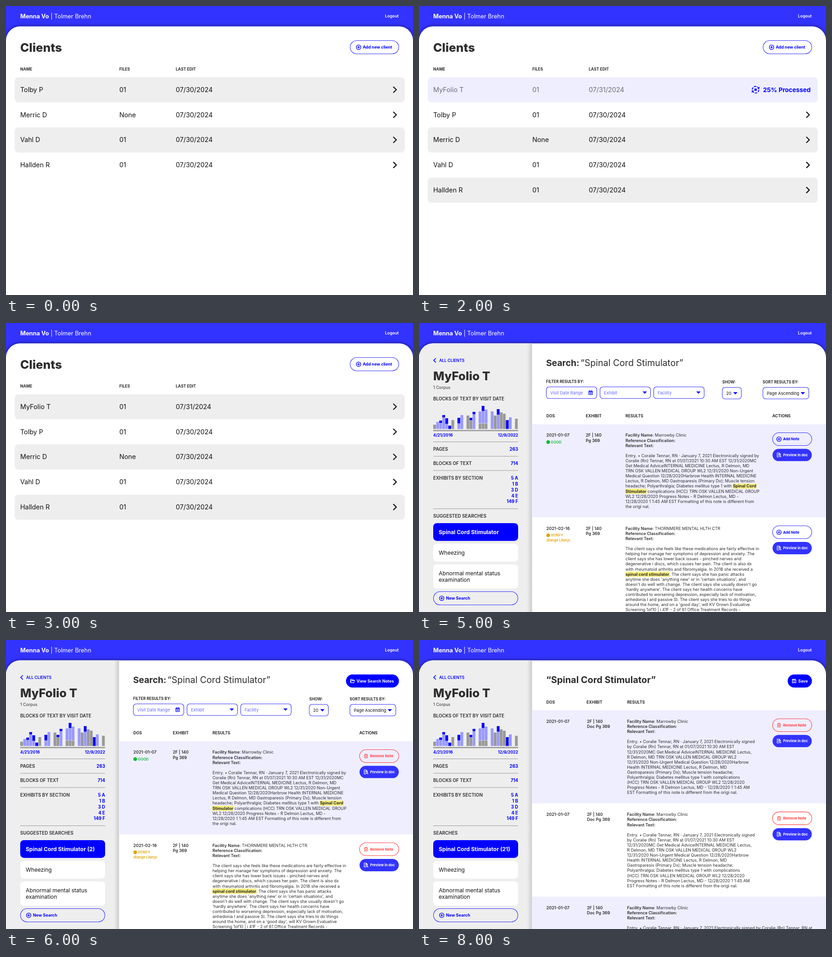
An HTML page for the animation above (9 s loop, 887x631 px).

```html
<!DOCTYPE html>
<html lang="en">
<head>
<meta charset="utf-8">
<title>Client files</title>
<style>
html, body { margin: 0; width: 100%; height: 100%; overflow: hidden; background: #fff; }
svg { display: block; width: 887px; height: 631px; font-family: Inter, sans-serif; }
text { white-space: pre; }
</style>
</head>
<body>
<svg id="stage" viewBox="0 0 887 631" xmlns="http://www.w3.org/2000/svg"></svg>
<script>
const stage = document.getElementById('stage');
const BLUE = '#0000ff', MID = '#3333ff', SOFT = '#6666ff', PALE = '#9999ff';
const GRAY = '#eeeeee', TINT = '#efeeff', INK = '#2d2d2d', RED = '#ff4040';
const FILE = 'MyFolio T';
const TERM = 'Spinal Cord Stimulator';
const SIDE = 246.4;

const text = (x, y, size, weight, fill, str, anchor = 'start') =>
  `<text x="${x}" y="${y}" font-size="${size}" font-weight="${weight}" fill="${fill}" text-anchor="${anchor}">${str}</text>`;
const box = (x, y, w, h, r, fill, stroke = 'none', sw = 1.1) =>
  `<rect x="${x}" y="${y}" width="${w}" height="${h}" rx="${r}" fill="${fill}" stroke="${stroke}" stroke-width="${sw}"/>`;
const line = (d, color, w = 1.2) =>
  `<path d="${d}" fill="none" stroke="${color}" stroke-width="${w}" stroke-linejoin="round"/>`;
const solid = (d, color) => `<path d="${d}" fill="${color}"/>`;
const dot = (x, y, r, fill, stroke = 'none', sw = 1.2) =>
  `<circle cx="${x}" cy="${y}" r="${r}" fill="${fill}" stroke="${stroke}" stroke-width="${sw}"/>`;
const at = (x, y, body) => `<g transform="translate(${x} ${y})">${body}</g>`;

// Icons, centred on (x, y)
const icon = {
  plus: (x, y, c) => dot(x, y, 4.9, 'none', c, 1.3) + line(`M${x - 2.8} ${y}h5.6M${x} ${y - 2.8}v5.6`, c, 1.3),
  down: (x, y) => solid(`M${x - 4.8} ${y - 2.5}h9.6l-4.8 5z`, BLUE),
  next: (x, y) => line(`M${x - 3.5} ${y - 6.5}l6.7 6.5-6.7 6.5`, '#111', 2.2),
  trash: (x, y, c) => at(x, y, line('M-4-2.8h8M-1.5-2.8v-1.4h3v1.4M-3-2.8v6.9h6v-6.9M-1-1v3.5M1-1v3.5', c, 1)),
  doc: (x, y, c) => at(x, y, line('M0 4.3h-3.9v-8.8h4.3l2.7 2.7v1.5M.2-4.3v2.8h2.7M-2.2-.8h2M-2.2 1.2h1', c, 1.1) +
    dot(1.9, 1.7, 1.7, 'none', c, 1.1) + line('M3.2 3l1.5 1.5', c, 1.2)),
  folder: (x, y, c) => at(x, y, line('M-4.3 3.6v-7.2h3l1.2 1.3h3.7v1.5M-4.3 3.6l1.7-4.7h7.4l-1.6 4.7z', c, 1.1)),
  save: (x, y, c) => at(x, y, line('M-3.9-3.9h6l1.8 1.8v6h-7.8zM-2-3.7v2.2h3.6v-2.2', c, 1.2) + dot(0, 1.4, 1.2, c)),
  calendar: (x, y, c) => at(x, y, box(-4, -3.8, 8, 8, 1, 'none', c, 1.2) +
    line('M-4-2h8M-2.2-5.2v2M2.2-5.2v2', c, 1.5) + line('M-2.6.2h5.2M-2.6 2.2h5.2', c, 1.1)),
  cloud: (x, y, c) => at(x, y, line('M-4 9.8h-4.5a6.5 6.5 0 0 1-1-12.9a9.7 9.7 0 0 1 19.1 1.9h.6a5.5 5.5 0 0 1 0 11h-6M0 9.8v-12.4M-5 1.8l5-4.9 5 4.9', c, 2.6)),
  lens: (x, y, c) => dot(x - 1.6, y - 1.7, 4.6, 'none', c, 2) + line(`M${x + 1.7} ${y + 1.7}l5 5`, c, 2.2),
  busy: (x, y, c) => at(x, y, `<circle r="7.2" fill="none" stroke="${c}" stroke-width="1.8" stroke-dasharray="5.5 2.04"/>` +
    box(-2.5, -2.5, 5, 5, .5, c) + solid('M8.3-6.8v4.8h-4.8zM-8.3 6.8v-4.8h4.8z', c))
};

const pill = (x, y, w, h, fill, stroke, color, size, pic, label, pad = 14) =>
  box(x, y, w, h, h / 2, fill, stroke) + icon[pic](x + pad, y + h / 2, color) +
  text(x + pad + 9, y + h / 2 + size * .36, size, 700, color, label);

const SHEET = 'M0 631V75.2a30.8 30.8 0 0 1 30.8-30.8H856.2a30.8 30.8 0 0 1 30.8 30.8V631z';
const DEFS = `<defs>
  <clipPath id="clip"><path d="${SHEET}"/></clipPath>
  <filter id="blur" x="-5%" y="-5%" width="110%" height="110%"><feGaussianBlur stdDeviation="4.5"/></filter>
  <linearGradient id="edge"><stop offset="0" stop-opacity="0"/><stop offset="1" stop-opacity=".14"/></linearGradient>
</defs>`;

const frame = body => DEFS + box(0, 0, 887, 631, 0, MID) +
  text(31, 27.3, 12.8, 400, '#fff', '<tspan font-weight="700">Menna Vo</tspan> | Tolmer Brehn') +
  text(856, 25.3, 8.9, 600, '#fff', 'Logout', 'end') +
  `<path d="${SHEET}" filter="url(#blur)" opacity=".55"/>` +
  `<g clip-path="url(#clip)">${box(0, 44, 887, 587, 0, '#fff')}${body}</g>`;

const CLIENTS = [['Tolby P', '01'], ['Merric D', 'None'], ['Vahl D', '01'], ['Hallden R', '01']];

function clientRow(i, name, files, date, busy) {
  const y = 155.5 + i * 54.8, base = y + 32.3, color = busy ? '#6b6b78' : '#111';
  const fill = busy ? TINT : i % 2 ? 'none' : GRAY;
  return box(19, y, 850, 54.8, 8, fill) +
    [[31, name], [247, files], [370, date]].map(([x, s]) => text(x, base, 14.3, 400, color, s)).join('') +
    (busy ? icon.busy(733.5, y + 27.2, BLUE) + text(853.5, base, 13.5, 700, BLUE, '25% Processed', 'end')
          : icon.next(847.5, y + 27.2));
}

// added: 0 none, 1 processing, 2 ready
function clients(added) {
  const rows = CLIENTS.map(([n, f]) => [n, f, '07/30/2024']);
  if (added) rows.unshift([FILE, '01', '07/31/2024']);
  return text(31, 100.3, 26, 800, INK, 'Clients') +
    pill(750, 75.5, 106, 29, '#fff', MID, BLUE, 8.9, 'plus', 'Add new client', 18.4) +
    [[31, 'NAME'], [247, 'FILES'], [370, 'LAST EDIT']].map(([x, s]) => text(x, 140.6, 8.6, 700, INK, s)).join('') +
    rows.map((r, i) => clientRow(i, ...r, added === 1 && i === 0)).join('');
}

const addPanel = () => clients(0) +
  `<rect y="44" width="887" height="587" opacity=".4"/>` +
  box(506, 44, 11.4, 587, 0, 'url(#edge)') + box(517.4, 44, 370, 587, 0, GRAY) +
  text(548, 94.2, 19.6, 700, INK, 'Add New Client') +
  box(548.5, 130.5, 307.5, 40, 8, '#fff', MID) + text(561, 155.2, 13.1, 400, SOFT, 'Client Name') +
  box(548.5, 177.5, 307.5, 128, 8, '#fff', MID) + icon.cloud(702.3, 215.5, SOFT) +
  ['Drag document here', 'or', '<tspan text-decoration="underline">browse files</tspan>']
    .map((s, i) => text(702.3, 251.8 + i * 16, 13.1, 400, SOFT, s, 'middle')).join('') +
  text(561, 343.2, 13.1, 400, BLUE, 'Cancel') +
  box(631.5, 318, 225, 41, 20.5, BLUE) + text(744, 343.2, 13.1, 700, '#fff', 'Add Client', 'middle');

// Bar slot, then segment heights from the base up: g gray, l light, b blue
const BARS = '0g10 1l16 2l13b6 3l25b6 4l11b13 5b8 6g20 8l12b13 9l31 11g30 12g19b6 13l32b6 15g12l27 16g13l26b12 17g12l31 19l39 20g30 21l31b13 22g37 23g34 24b20 25l26 27g23';
const PLAIN = '0g10 1g16 2g14 3g28 4g24 5g8 6g20 8g24 9g28 11g30 12g23 13g39 15g39 16g48 17g43 19g39 20g30 21g42 22g37 23g34 24g20 25g27 27g23';
function chart(spec) {
  const tone = { g: '#999', l: PALE, b: BLUE };
  return spec.split(' ').map(bar => {
    let y = 232;
    const x = 31 + parseInt(bar) * 6.6;
    return [...bar.matchAll(/([glb])(\d+)/g)].map(([, k, h]) => {
      y -= +h;
      return box(x, y, 6, h - .6, 0, tone[k]);
    }).join('');
  }).join('') + box(31, 233.6, 185, 2.6, 0, '#999');
}

function sidebar(active, title, count) {
  const label = (y, s) => text(31, y, 9.9, 600, INK, s);
  const value = (y, s) => text(216, y, 9.7, 700, BLUE, s, 'end');
  const cut = n => active ? n.slice(0, -1) : n;
  const sections = ['51 A', '10 B', '39 D', '42 E', '1496 F'];
  return box(0, 44, SIDE, 587, 0, GRAY) + box(SIDE - 11, 44, 11, 587, 0, 'url(#edge)') +
    line('M36.8 77l-4.8 4.6 4.8 4.6', BLUE, 1.6) + text(44, 84.7, 8.7, 600, BLUE, 'ALL CLIENTS') +
    text(31, 125.2, 25.7, 800, INK, FILE) + text(31, 143.8, 9, 400, INK, '1 Corpus') +
    text(31, 168.5, 9.8, 600, INK, 'BLOCKS OF TEXT BY VISIT DATE') +
    chart(active ? BARS : PLAIN) +
    text(31, 248, 8.7, 700, BLUE, '4/21/2016') + text(216, 248, 8.7, 700, BLUE, '12/9/2022', 'end') +
    line('M31 259.5h185M31 291h185M31 322h185M31 405.5h185', '#999', 1) +
    label(278.7, 'PAGES') + value(278.7, cut('2631')) +
    label(310.3, 'BLOCKS OF TEXT') + value(310.3, cut('7149')) +
    label(341.8, 'EXHIBITS BY SECTION') +
    sections.map((s, i) => {
      const [n, k] = s.split(' ');
      return value(341.8 + i * 12.9, cut(n) + ' ' + k);
    }).join('') +
    label(424.8, title) +
    box(31, 437, 185, 38.7, 8, active ? BLUE : '#fff') +
    (active ? text(43, 460.8, 12, 700, '#fff', TERM + count) : text(43, 460.8, 12, 400, '#111', TERM)) +
    box(31, 482, 185, 39, 8, '#fff') + text(43, 505.8, 12, 400, '#111', 'Wheezing') +
    box(31, 527, 185, 53, 8, '#fff') + text(43, 550.8, 12, 400, '#111', 'Abnormal mental status') +
    text(43, 565, 12, 400, '#111', 'examination') +
    (active ? box(31.5, 586.5, 184, 29, 14.5, 'none', MID) + icon.plus(49.5, 601, BLUE) +
      text(58.7, 604.3, 9, 700, BLUE, 'New Search') : '');
}

function filters(dy) {
  const field = (x, w, y, s, color) => box(x + .5, y + dy, w, 25.3, 6, '#fff', MID) +
    text(x + 9, y + 16 + dy, 9.2, 400, color, s);
  return text(277, 126.5 + dy, 8.4, 700, INK, 'FILTER RESULTS BY:') +
    text(661, 127.7 + dy, 8.4, 700, INK, 'SHOW:') + text(749, 127.7 + dy, 8.4, 700, INK, 'SORT RESULTS BY:') +
    field(277, 110, 135.5, 'Visit Date Range', SOFT) + icon.calendar(374, 148.3 + dy, BLUE) +
    field(394, 110, 135.5, 'Exhibit', SOFT) + icon.down(492, 148 + dy) +
    field(511, 110, 135.5, 'Facility', SOFT) + icon.down(609, 148 + dy) +
    field(660.5, 41.5, 136.5, '20', '#111') + icon.down(689.5, 149.5 + dy) +
    field(749, 100, 136.5, 'Page Ascending', '#111') + icon.down(836.5, 149.5 + dy);
}

const searchForm = () => sidebar(false, 'SUGGESTED SEARCHES') +
  text(277, 94, 19.4, 700, INK, 'Search document') + filters(0) +
  box(277.5, 181, 578.5, 35, 17.5, '#fff', MID) + icon.lens(298.5, 198.5, BLUE) +
  text(311, 203.6, 14.5, 400, PALE, 'New Search, eg ' + TERM) +
  box(740, 180.5, 116.5, 36, 18, BLUE) + text(798, 203.2, 12.9, 700, '#fff', 'RUN SEARCH', 'middle');

// *bold* and [highlighted bold]
const rich = s => s.replace(/\*(.+?)\*/g, '<tspan font-weight="600">$1</tspan>')
  .replace(/\[(.+?)\]/g, '<tspan class="hit" font-weight="700">$1</tspan>');
const lines = (x, y, list) => list.split('\n').map((s, i) =>
  s && text(x, (y + i * 11.1).toFixed(1), 9, 400, INK, rich(s))).join('');
const intro = place => `*Facility Name*: ${place}\n*Reference Classification:*\n*Relevant Text:*\n\n`;
const CLINIC = 'Marrowby Clinic';

const NOTE = `Entry. • Coralie Tennar, RN · January 7, 2021 Electronically signed by
Coralie (Rn) Tennar, RN at 01/07/2021 10:30 AM EST 12/31/2020MC
Get Medical AdviceINTERNAL MEDICINE Lectus, R Delmon, MD
TRN OSK VALLEN MEDICAL GROUP WL2 12/31/2020 Non-Urgent
Medical Question 12/28/2020Harbrow Health INTERNAL MEDICINE
Lectus, R Delmon, MD Gastroparesis (Primary Dx); Muscle tension
headache; Polyarthralgia; Diabetes mellitus type 1 with [Spinal Cord]
[Stimulator] complications (HCC) TRN OSK VALLEN MEDICAL GROUP
WL2 12/28/2020 Progress Notes - R Delmon Lectus, MD -
12/28/2020 1 1:45 AM EST Formatting of this note is different from
the origi nal.`;

const VISIT = `The client says she feels like these medications are fairly effective in
helping her manage her symptoms of depression and anxiety. The
client says she has lower back issues - pinched nerves and
degenerative i discs, which causes her pain. The client is also dx
with rheumatoid arthritis and fibromyalgia. In 2018 she received a
[spinal cord stimulator]. The client says she has panic attacks
anytime she does 'anything new' or in 'certain situations', and
doesn't do well with change. The client says she usually doesn't go
'hardly anywhere'. The client says her health concerns have
contributed to worsening depression, especially lack of motivation,
anhedonia I and passive SI. The client says she tries to do things
around the home, and on a 'good day', will KV Grown Evaluative
Screening 1of10 | i 41F - 2 of 61 Office Treatment Records -`;

const SAVED = `Entry. • Coralie Tennar, RN · January 7, 2021 Electronically signed
by Coralie (Rn) Tennar, RN at 01/07/2021 10:30 AM EST
12/31/2020MC Get Medical AdviceINTERNAL MEDICINE Lectus,
R Delmon, MD TRN OSK VALLEN MEDICAL GROUP WL2
12/31/2020 Non-Urgent Medical Question 12/28/2020Harbrow
Health INTERNAL MEDICINE Lectus, R Delmon, MD
Gastroparesis (Primary Dx); Muscle tension headache;
Polyarthralgia; Diabetes mellitus type 1 with complications
(HCC) TRN OSK VALLEN MEDICAL GROUP WL2 12/28/2020
Progress Notes - R Delmon Lectus, MD - 12/28/2020 1 1:45 AM
EST Formatting of this note is different from the origi nal.`;
const SAVED_WIDE = 'Entry. • Coralie Tennar, RN · January 7, 2021 Electronically signed by Coralie (Rn) Tennar, RN at';

const heads = (y, list) => list.map(([x, s]) => text(x, y, 8.7, 700, INK, s)).join('');
const actions = (y, noted) =>
  (noted ? pill(770.5, y + 18.5, 85.5, 28, 'none', RED, RED, 7.8, 'trash', 'Remove Note')
         : pill(770.5, y + 18.5, 85.5, 28, 'none', MID, BLUE, 7.8, 'plus', 'Add Note')) +
  pill(770.5, y + 53.8, 85.5, 26.8, MID, 'none', '#fff', 7.6, 'doc', 'Preview in doc');
const entry = (y, date, exhibit, x, page) =>
  text(277.5, y + 27.4, 9.1, 600, INK, date) + lines(x, y + 27.4, `*${exhibit}*\n*${page}*`);

function results(noted) {
  const GREEN = '#12b83c', AMBER = '#e0a50c';
  return text(277, 94, 19.2, 700, INK, 'Search:') + text(352, 94, 19.6, 400, INK, `“${TERM}”`) +
    (noted ? pill(741, 75.2, 115.3, 28.6, BLUE, 'none', '#fff', 8.8, 'folder', 'View Search Notes') : '') +
    filters(4) +
    heads(206.3, [[277.5, 'DOS'], [363.5, 'EXHIBIT'], [450, 'RESULTS'], [770, 'ACTIONS']]) +
    box(SIDE, 221, 641, 203.3, 0, TINT) +
    entry(221, '2021-01-07', '2F | 140', 363.5, 'Pg 369') +
    dot(281.5, 260, 4, GREEN) + text(287.3, 262.8, 7.8, 600, GREEN, 'GOOD') +
    lines(450, 248.4, intro(CLINIC) + NOTE) + actions(221, noted) +
    entry(424.3, '2021-02-16', '2F | 140', 363.5, 'Pg 369') +
    dot(281.5, 463.4, 4, AMBER) + text(287.3, 466.2, 7.6, 600, AMBER, 'VERIFY') +
    text(277.5, 477.3, 7.6, 600, AMBER, '(Range Likely)') +
    lines(450, 451.7, intro('THORNMERE MENTAL HLTH CTR') + VISIT) + actions(424.3, noted);
}

const notes = () => text(277, 94, 19.9, 700, INK, `“${TERM}”`) +
  pill(803.5, 75.2, 52.8, 28.6, BLUE, 'none', '#fff', 8.7, 'save', 'Save') +
  heads(138.8, [[277.5, 'DOS'], [365, 'EXHIBIT'], [453.5, 'RESULTS']]) +
  [0, 1, 2].map(i => {
    const y = 153.5 + i * 203.4, full = i < 2;
    return box(SIDE, y, 641, 203.4, 0, i % 2 ? '#fff' : TINT) +
      entry(y, '2021-01-07', '2F | 140', 366, 'Doc Pg 369') +
      lines(453.5, y + 27.4, intro(CLINIC) + (full ? SAVED : SAVED_WIDE)) +
      (full ? actions(y, true) : '');
  }).join('');

const SUGGESTED = 'SUGGESTED SEARCHES';
const scenes = [
  () => clients(0),
  addPanel,
  () => clients(1),
  () => clients(2),
  searchForm,
  () => sidebar(true, SUGGESTED, '') + results(false),
  () => sidebar(true, SUGGESTED, ' (2)') + results(true),
  () => sidebar(true, 'SEARCHES', ' (21)') + results(true),
  () => sidebar(true, 'SEARCHES', ' (21)') + notes()
];

function markHits() {
  for (const hit of stage.querySelectorAll('.hit')) {
    const p = hit.getStartPositionOfChar(0);
    hit.parentNode.insertAdjacentHTML('beforebegin',
      box(p.x - .5, p.y - 8.7, hit.getComputedTextLength() + 1, 11.3, 0, '#f7ee7c'));
  }
}

let shown = -1;
function tick(now) {
  const i = Math.floor(now % 9000 / 1000);
  if (i !== shown) {
    shown = i;
    stage.innerHTML = frame(scenes[i]());
    markHits();
  }
  requestAnimationFrame(tick);
}
tick(performance.now());
</script>
</body>
</html>
```
